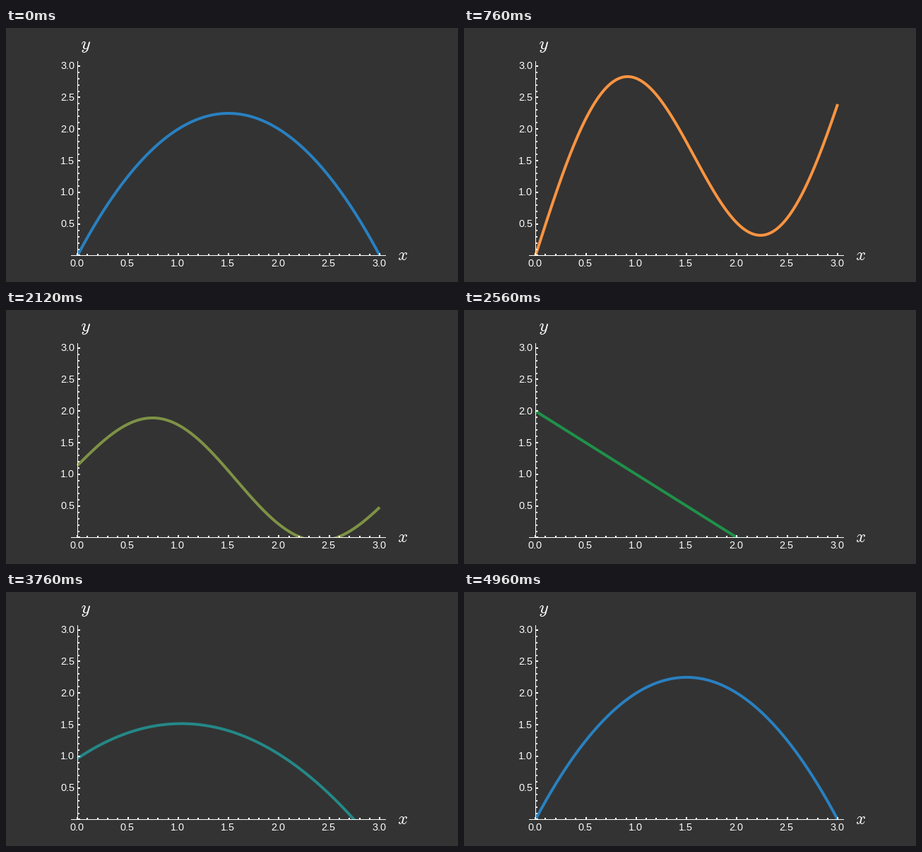
Write a matplotlib script that moves like this. It is 640 px wide and 360 px high and loops after 5000 ms.

```python
import numpy as np
import matplotlib.pyplot as plt
from matplotlib.animation import FuncAnimation
from matplotlib.colors import to_rgb
from matplotlib.patches import Rectangle

WIDTH, HEIGHT, DPI = 640, 360, 100
FRAMES, INTERVAL = 125, 40
ORIGIN_X, ORIGIN_Y = 101.2, 322.5
UNIT_X, UNIT_Y = 142.63, 89.6
AXIS_COLUMN, AXIS_ROW = 101, 322
# Each third of the loop holds one move; it begins slightly early.
LEAD, MOVE_SHARE = 0.028, 0.558

plt.rcParams.update({
    "font.family": "Liberation Sans",
    "mathtext.fontset": "cm",
    "text.hinting": "native",
    "text.hinting_factor": 1,
})


def points(px):
    return px * 72 / DPI


def to_x(x):
    return ORIGIN_X + UNIT_X * x


def to_y(y):
    return ORIGIN_Y - UNIT_Y * y


xs = np.linspace(0, 3, 400)
CURVES = [
    (3 * xs - xs**2, np.array(to_rgb("#2980c0"))),
    (xs + 2 * np.sin(2 * xs), np.array(to_rgb("#fd943f"))),
    (2 - xs, np.array(to_rgb("#1f914a"))),
]

fig = plt.figure(figsize=(WIDTH / DPI, HEIGHT / DPI), dpi=DPI, facecolor="#333333")
ax = fig.add_axes([0, 0, 1, 1])
ax.set_xlim(0, WIDTH)
ax.set_ylim(HEIGHT, 0)
ax.axis("off")


def bar(x, y, width, height):
    ax.add_patch(Rectangle((x, y), width, height, facecolor="white", lw=0,
                           snap=False, zorder=3))


def draw_axes():
    bar(92, AXIS_ROW, 446, 1)
    bar(AXIS_COLUMN, 47, 1, AXIS_ROW - 46)
    for i in range(31):
        value = i / 10
        major = i % 5 == 0
        size = 4 if major else 3
        bar(round(to_x(value)) - 1, AXIS_ROW + 1 - size, 2, size)
        bar(AXIS_COLUMN, round(to_y(value)) - 1, size, 2)
        if major:
            style = dict(color="white", fontsize=points(14), va="baseline")
            ax.text(to_x(value) - 1, 338, f"{value:.1f}", ha="center", **style)
            if i:
                ax.text(97, to_y(value) + 4.5, f"{value:.1f}", ha="right", **style)
    for name, x, y in (("$x$", 553.5, 329), ("$y$", 106, 30)):
        ax.text(x, y, name, color="white", fontsize=points(25), va="baseline")


def smoother(u):
    u = np.clip(u, 0, 1)
    return u**3 * (10 - 15 * u + 6 * u**2)


draw_axes()
curve, = ax.plot([], [], lw=points(4), solid_capstyle="butt", zorder=2)
curve.set_clip_path(Rectangle((0, 0), WIDTH, ORIGIN_Y, transform=ax.transData))


def update(frame):
    phase = 3 * frame / FRAMES + LEAD
    index = int(phase)
    mix = smoother((phase - index) / MOVE_SHARE)
    (y0, color0), (y1, color1) = CURVES[index % 3], CURVES[(index + 1) % 3]
    curve.set_data(to_x(xs), to_y(y0 + (y1 - y0) * mix))
    curve.set_color(tuple(color0 + (color1 - color0) * mix))
    return curve,


animation = FuncAnimation(fig, update, frames=FRAMES, interval=INTERVAL,
                          repeat=True, repeat_delay=0)
plt.show()
```
